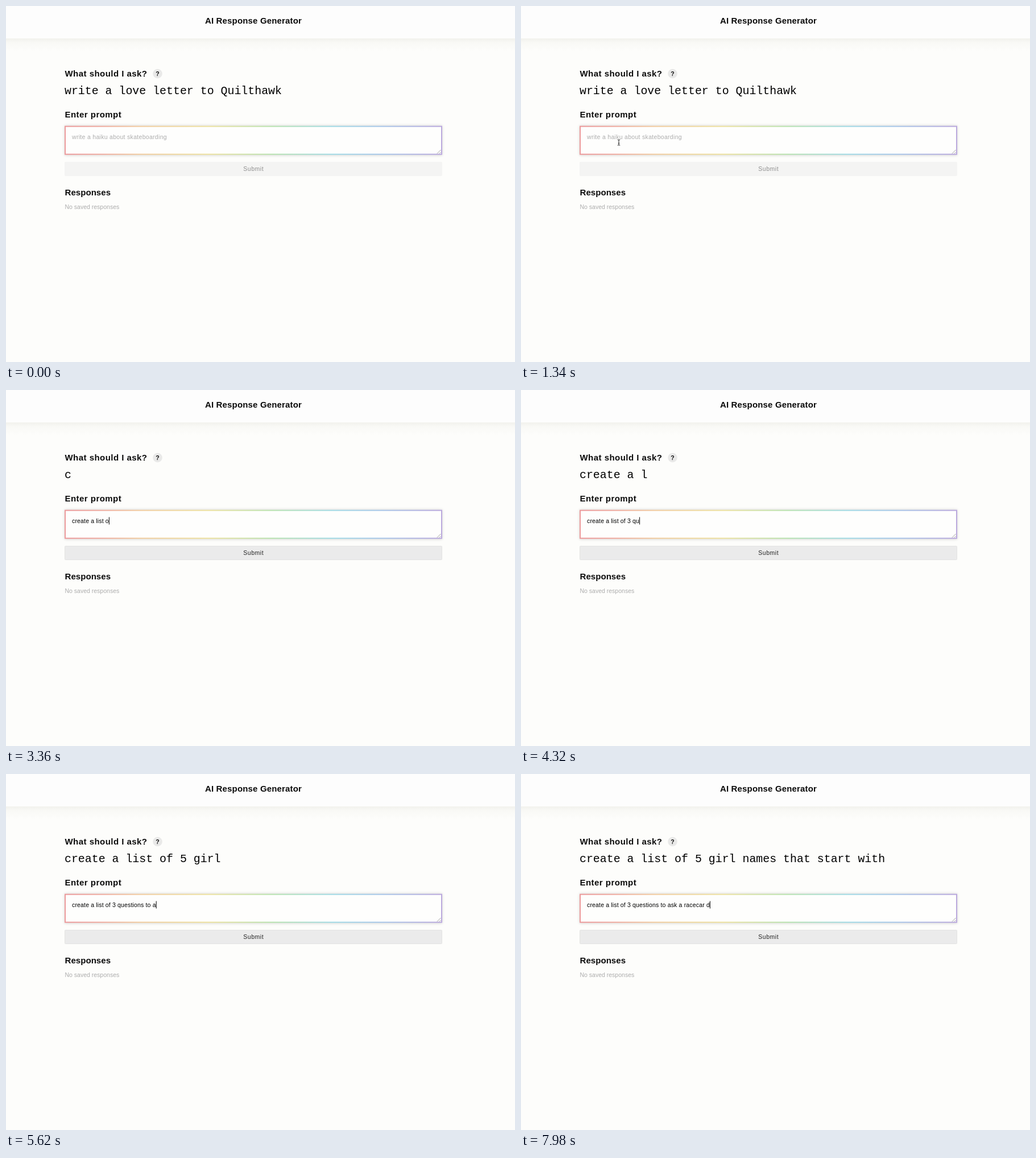
An HTML page for the animation above (8 s loop, 895 by 626 pixels).

```html
<!DOCTYPE html>
<html lang="en">
<head>
<meta charset="utf-8">
<title>AI Response Generator</title>
<style>
  html, body { margin: 0; width: 100%; height: 100%; overflow: hidden; background: #fdfdfb; }
  svg { display: block; width: 895px; height: 626px; }
  text { font: 10.5px "Liberation Sans", Arial, sans-serif; fill: #111; white-space: pre; }
  .heading { font-size: 15px; font-weight: 700; fill: #0b0b0b; }
  .wide { letter-spacing: .46px; }
  .hint { fill: #adadad; }
  .middle { text-anchor: middle; }
  #idea { font: 19.9px "Liberation Mono", "Courier New", monospace; fill: #000; }
  #typed { letter-spacing: .16px; fill: #000; }
  #button { fill: #f4f4f3; stroke: #f4f4f3; }
  #label { letter-spacing: .55px; fill: #8e8e8e; }
  .ready #button { fill: #ebebeb; stroke: #e3e3e2; }
  .ready #label { fill: #222; }
</style>
</head>
<body>
<svg id="stage" viewBox="0 0 895 626">
  <defs>
    <linearGradient id="shade" x2="0" y2="1">
      <stop stop-color="#f2f2ed"/>
      <stop offset=".35" stop-color="#f9f9f6"/>
      <stop offset="1" stop-color="#fdfdfb"/>
    </linearGradient>
    <linearGradient id="rainbow" gradientUnits="userSpaceOnUse" x1="103" x2="767" y1="0" y2="0">
      <stop stop-color="#ec9a9c"/>
      <stop offset=".1" stop-color="#f0aca0"/>
      <stop offset=".2" stop-color="#f2cda0"/>
      <stop offset=".38" stop-color="#eee2a0"/>
      <stop offset=".55" stop-color="#b9e3b0"/>
      <stop offset=".71" stop-color="#a2dbe6"/>
      <stop offset=".84" stop-color="#a9c7e9"/>
      <stop offset="1" stop-color="#bba9dd"/>
    </linearGradient>
    <filter id="soft" x="-5%" y="-30%" width="110%" height="160%">
      <feGaussianBlur stdDeviation="2.5"/>
    </filter>
  </defs>

  <rect width="895" height="626" fill="#fdfdfb"/>
  <rect y="57" width="895" height="22" fill="url(#shade)"/>
  <rect width="895" height="57" fill="#fdfdfd"/>
  <text class="heading middle" x="435" y="30.5" letter-spacing=".16">AI Response Generator</text>

  <text class="heading wide" x="103.5" y="124">What should I ask?</text>
  <circle cx="266.5" cy="119" r="8.3" fill="#e9e9e8"/>
  <text class="middle" x="266.5" y="123" style="font-weight:700">?</text>
  <text id="idea" x="103" y="155"></text>

  <text class="heading wide" x="103.5" y="195.5">Enter prompt</text>
  <rect x="103" y="210.5" width="664" height="52" fill="#000" opacity=".16" filter="url(#soft)"/>
  <rect x="104" y="211.7" width="662" height="49" fill="#fefefd" stroke="url(#rainbow)" stroke-width="2"/>
  <path d="M758 259.5l6.5-6.5M762 259.5l2.5-2.5" stroke="#8a8a8a" stroke-width=".8"/>
  <text id="placeholder" class="hint" x="116" y="233.5" letter-spacing=".3">write a haiku about skateboarding</text>
  <text id="typed" x="116" y="233.5"></text>
  <rect id="caret" y="223.5" width="1" height="13"/>

  <rect id="button" x="103.5" y="274.5" width="663" height="24" rx="1"/>
  <text id="label" class="middle" x="435.2" y="290">Submit</text>

  <text class="heading" x="103.5" y="333" letter-spacing=".06">Responses</text>
  <text class="hint" x="103.5" y="357">No saved responses</text>

  <path id="arrow" d="M0 0v12l2.8-2.6 1.9 4.4 2-.9-1.9-4.2h3.8z" fill="#000" stroke="#fff" stroke-width=".8"/>
  <path id="beam" d="M-2.2-5Q0-5 0-3.6Q0-5 2.2-5M0-3.6V3.6M-2.2 5Q0 5 0 3.6Q0 5 2.2 5M-1.2 1.4H1.2" fill="none" stroke="#222"/>
</svg>
<script>
  const LOOP = 8000;
  const FIRST_IDEA = "write a love letter to Quilthawk";
  const NEXT_IDEA = "create a list of 5 girl names that start with";
  const PROMPT = "create a list of 3 questions to ask a racecar d";
  // [time in ms, characters typed]
  const TYPING = [[1500, 0], [2400, 9.4], [4320, 21.5], [5620, 33.5], [6740, 40.5], [8000, 47.6]];
  const DELETE_START = 2395, DELETE_STEP = 25;
  const IDEA_START = 3190, IDEA_STEP = 104;
  const MOVE_START = 500, MOVE_END = 1150, FOCUS = 1420;

  const el = id => document.getElementById(id);
  const [stage, idea, placeholder, typed, caret, arrow, beam] =
    ["stage", "idea", "placeholder", "typed", "caret", "arrow", "beam"].map(el);
  const show = (node, on) => node.setAttribute("visibility", on ? "visible" : "hidden");
  const clamp01 = v => Math.min(1, Math.max(0, v));

  function typedCount(t) {
    let count = 0;
    for (let i = 1; i < TYPING.length; i++) {
      const [t0, n0] = TYPING[i - 1], [t1, n1] = TYPING[i];
      if (t >= t0) count = n0 + (n1 - n0) * clamp01((t - t0) / (t1 - t0));
    }
    return Math.floor(count);
  }

  function ideaAt(t) {
    if (t < DELETE_START) return FIRST_IDEA;
    if (t >= IDEA_START) return NEXT_IDEA.slice(0, Math.floor((t - IDEA_START) / IDEA_STEP));
    const removed = 1 + Math.floor((t - DELETE_START) / DELETE_STEP);
    return FIRST_IDEA.slice(0, Math.max(0, FIRST_IDEA.length - removed));
  }

  function drawPointer(t, typing) {
    const p = clamp01((t - MOVE_START) / (MOVE_END - MOVE_START));
    const eased = p * p * (3 - 2 * p);
    const x = 215 - 43 * eased, y = 360 - 120 * eased;
    const inField = y < 261, visible = t >= MOVE_START && !typing;
    for (const node of [arrow, beam]) node.setAttribute("transform", `translate(${x} ${y})`);
    show(arrow, visible && !inField);
    show(beam, visible && inField);
  }

  function draw(t) {
    const count = typedCount(t);
    idea.textContent = ideaAt(t);
    typed.textContent = PROMPT.slice(0, count);
    caret.setAttribute("x", 116 + (count ? typed.getComputedTextLength() : 0));
    show(caret, t >= FOCUS);
    show(placeholder, !count);
    stage.classList.toggle("ready", count > 0);
    drawPointer(t, count > 0);
  }

  const start = performance.now();
  function tick() {
    draw((performance.now() - start) % LOOP);
    requestAnimationFrame(tick);
  }
  tick();
</script>
</body>
</html>
```
